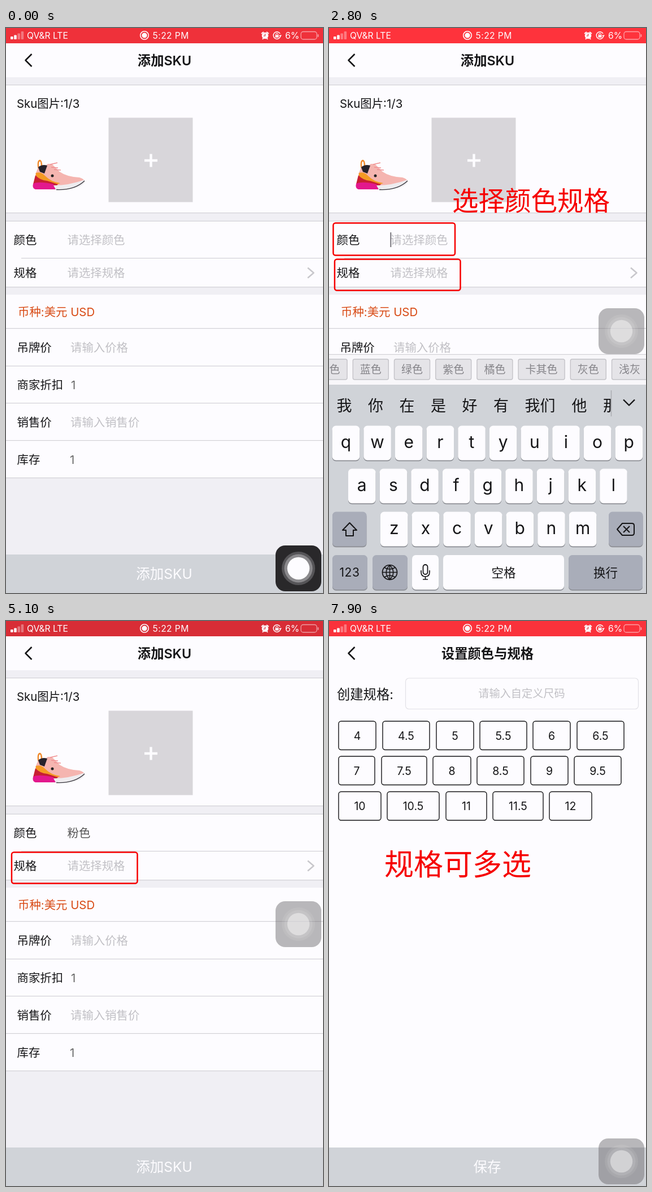
An HTML page that plays this animation: 561x998 px, repeating every 8000 ms.

```html
<!DOCTYPE html>
<html lang="zh-CN">
<head>
<meta charset="utf-8">
<style>
html, body { margin: 0; width: 100%; height: 100%; overflow: hidden; background: #fdfcff }
svg { display: block; width: 100vw; height: 100vh; font-family: Inter, "Noto Sans CJK SC", "Noto Sans CJK", sans-serif }
text { white-space: pre }
</style>
</head>
<body>
<svg id="stage" viewBox="0 0 561 998"></svg>
<script>
const WHITE = '#fdfcff', GREY = '#f0eff4', INK = '#151517', HINT = '#c1c0c5', LINE = '#d2d1d6', RED = '#f60000';

// y is the vertical middle of the text
const text = (x, y, s, size = 20.4, fill = INK, more = '') =>
  `<text x="${x}" y="${y + size * .37}" font-size="${size}" fill="${fill}" ${more}>${s}</text>`;
const mid = (x, y, s, size, fill, more = '') => text(x, y, s, size, fill, 'text-anchor="middle" ' + more);
const rect = (x, y, w, h, fill, more = '') =>
  `<rect x="${x}" y="${y}" width="${w}" height="${h}" fill="${fill}" ${more}/>`;
const circle = (x, y, r, fill, more = '') => `<circle cx="${x}" cy="${y}" r="${r}" fill="${fill}" ${more}/>`;
const path = (d, stroke, width = 2, fill = 'none') =>
  `<path d="${d}" fill="${fill}" stroke="${stroke}" stroke-width="${width}" stroke-linejoin="round"/>`;
const group = (id, body) => `<g id="${id}">${body}</g>`;
const line = (y, x = 0) => rect(x, y, 561 - x, 1.2, LINE);
const frame = (x, y, w, h) => rect(x, y, w, h, 'none', `rx="4" stroke="${RED}" stroke-width="2.5"`);
const header = title => path('M45.5 46L34.5 57L45.5 68', INK, 2.5) + mid(280.5, 57, title, 23.3, INK, 'font-weight="600"');
const footer = label => rect(0, 930, 561, 68, '#d0d3d8') + mid(280, 964, label, 24.5, WHITE);

const shoe =
  path('M58 250Q55 235 60 234Q63 235 63 244', '#f08a2c', 2.5) +
  path('M52 258L58 244Q66 247 74 240L81 240L95 254Q108 263 130 264Q140 267 139 273L95 279L66 273Z', 'none', 0, '#f5b5b0') +
  path('M57 246Q64 240 73 243L68 257L60 254Z', 'none', 0, '#26222a') +
  path('M53 256Q62 253 69 261Q80 272 96 274L84 279L52 268Z', 'none', 0, '#f59a24') +
  path('M52 260Q60 269 73 270L92 276L84 284L48 276Z', 'none', 0, '#c71f32') +
  path('M48 275Q58 270 84 276L88 285L52 285Q46 283 48 275Z', 'none', 0, '#e3188d') +
  path('M84 278Q112 278 139 268Q141 274 131 280Q118 286 88 285Z', 'none', 0, '#eeecef') +
  path('M89 285.5Q121 287 139 270', '#36343b', 1.3) +
  path('M78 241L91 238M80 246L92 247M85 250L97 251', '#f08f91', 1.6) +
  circle(82, 261, 2.5, '#222');

const formRows = [
  [564, '吊牌价', '请输入价格', 114, HINT],
  [630, '商家折扣', '1', 115, '#666'],
  [696, '销售价', '请输入销售价', 114, HINT],
  [762, '库存', '1', 113, '#666']
].map(([y, name, value, x, fill]) => text(19.5, y, name) + text(x, y, value, 20.4, fill)).join('');

const formPage = rect(0, 0, 561, 998, GREY) +
  rect(0, 27, 561, 60, WHITE) + rect(0, 100, 561, 227, WHITE) +
  rect(0, 341, 561, 116, WHITE) + rect(0, 471, 561, 323, WHITE) +
  header('添加SKU') + [100, 326, 340.5, 457, 530, 596.5, 662, 728, 794].map(y => line(y)).join('') + line(406, 27) +
  text(19, 133, 'Sku图片:1/3') + shoe +
  rect(181.5, 158.5, 149, 149, '#d8d6da') + rect(245, 231.8, 23, 4.4, WHITE) + rect(254.3, 222.5, 4.4, 23, WHITE) +
  text(13.5, 374, '颜色') + group('hint', text(108.5, 374, '请选择颜色', 20.4, HINT)) +
  group('picked', text(108.5, 374, '粉色', 20.4, '#555')) +
  text(13.5, 432, '规格') + text(108.5, 432, '请选择规格', 20.4, HINT) +
  path('M534 423.5L544.5 432.5L534 441.5', '#c8c7cc', 2.5) +
  text(21, 501, '币种:美元 USD', 20.4, '#d84a14') + formRows + footer('添加SKU') +
  group('caret', rect(108.3, 361, 2, 26, '#77767c'));

const sizeRows = [
  [177, [17, 83, 4], [95, 178, 4.5], [190, 256, 5], [267, 350, 5.5], [361, 427, 6], [439, 522, 6.5]],
  [239, [17, 81, 7], [93, 173, 7.5], [184, 251, 8], [262, 345, 8.5], [357, 423, 9], [434, 517, 9.5]],
  [301.5, [17, 92, 10], [103, 195, 10.5], [207, 279, 11], [290, 379, 11.5], [390, 465, 12]]
];
const sizePage = rect(0, 0, 561, 998, WHITE) + header('设置颜色与规格') + text(14, 129, '创建规格:', 23.3) +
  rect(135.5, 101, 412, 54.5, 'none', 'rx="6" stroke="#e2e1e6" stroke-width="1.2"') +
  mid(341, 128, '请输入自定义尺码', 19.2, HINT) +
  sizeRows.map(([y, ...cells]) => cells.map(([a, b, n]) =>
    rect(a, y, b - a, 50.5, 'none', `rx="4.5" stroke="${INK}" stroke-width="1.4"`) + mid((a + b) / 2, y + 25.5, n, 19.5)
  ).join('')).join('') + footer('保存');

let chipX = 11;
const chips = '黑色 白色 红色 黄色 蓝色 绿色 紫色 橘色 卡其色 灰色 浅灰 粉色'.split(' ').map(name => {
  const w = 25 + 19 * name.length, x = chipX;
  chipX += w + 10.2;
  return rect(x, 585, w, 36, '#e5e4e8', 'rx="3" stroke="#c4c3c8" stroke-width="1.4"') + mid(x + w / 2, 603, name, 19, '#858489');
}).join('');

const key = (x, y, w, fill = WHITE) =>
  rect(x, y + 1.7, w, 61, '#8c8e94', 'rx="6.5"') + rect(x, y, w, 61, fill, 'rx="6.5"');
const letters = (row, x, y) => [...row].map((c, i) => {
  const kx = x + 55.65 * i;
  return key(kx, y, 48.5) + mid(kx + 24.2, y + 28, c, 30);
}).join('');
const words = [...'我你在是好有', '我们'].map((w, i) => text(13.5 + 55.5 * i, 667, w, 27)).join('') +
  text(429.5, 667, '他', 27) + text(485, 667, '那', 27);
const DARK_KEY = '#a9adb9';

const keyboard = rect(0, 576, 561, 54, '#f8f7fa') + line(576) + group('chips', chips) +
  rect(0, 630, 561, 420, '#d0d3d8') + words + rect(499, 632, 62, 66, '#d0d3d8') +
  rect(498.8, 640, 1.4, 46, '#a9abb0') + path('M521 656.5L531 666.5L541 656.5', INK, 2.4) +
  letters('qwertyuiop', 5.7, 702.5) + letters('asdfghjkl', 34, 778.5) + letters('zxcvbnm', 91, 854.5) +
  key(6, 854.5, 60.5, DARK_KEY) + path('M36.5 874L49 887H43V897H30V887H24Z', INK, 2) +
  key(495, 854.5, 60.5, DARK_KEY) + path('M519 875H536Q540 875 540 879V892Q540 896 536 896H519L510 885.5Z', INK, 2) +
  path('M521 880L532 891M532 880L521 891', INK, 2) +
  key(6, 931, 62, DARK_KEY) + mid(36.5, 961, '123', 21, INK, 'letter-spacing=".5"') +
  key(77, 931, 62, DARK_KEY) + circle(107.5, 961.5, 13, 'none', `stroke="${INK}" stroke-width="1.7"`) +
  path('M107.5 948.5V974.5M94.5 961.5H120.5M98 953Q107.5 959 117 953M98 970Q107.5 964 117 970M107.5 948.5Q95 961.5 107.5 974.5Q120 961.5 107.5 948.5', INK, 1.5) +
  key(147, 931, 47) + rect(166.5, 948, 8, 17, 'none', `rx="4" stroke="${INK}" stroke-width="1.8"`) +
  path('M163 958V961Q163 969 170.5 969Q178 969 178 961V958M170.5 969V974M166 974H175', INK, 1.7) +
  key(202, 931, 214) + mid(309, 962, '空格', 21.5) +
  key(424, 931, 131, DARK_KEY) + mid(489.5, 962, '换行', 21.5);

const status = rect(0, 0, 561, 27, '#e8303b', 'id="bar"') +
  [5, 7.5, 10.5, 14].map((h, i) => rect(8 + 6.2 * i, 20 - h, 4.6, h, WHITE, `rx="1" opacity="${i < 2 ? 1 : .35}"`)).join('') +
  text(37, 13.5, 'QV&amp;R', 15.7, WHITE) + text(83, 13.5, 'LTE', 15.7, WHITE) +
  circle(245, 13, 7.3, 'none', `stroke="${WHITE}" stroke-width="1.6"`) + circle(245, 13, 4.6, WHITE) +
  text(259.5, 13.5, '5:22 PM', 15.7, WHITE, 'letter-spacing=".4"') +
  circle(458.5, 13.5, 5.8, WHITE) + path('M452 10L456 7M465 10L461 7M454 20L455.5 18M463 20L461.5 18', WHITE, 2) +
  path('M458.5 10V14H455.5', '#d8323c', 1.2) +
  path('M485 10A6.3 6.3 0 1 0 485.5 15', WHITE, 1.5) + path('M483 12.5H488L485.5 16Z', 'none', 0, WHITE) +
  rect(476.5, 12.3, 6, 4.5, WHITE) + path('M477.7 12V10.5Q479.5 8 481.3 10.5V12', WHITE, 1.1) +
  text(494, 13.5, '6%', 15.7, WHITE) +
  rect(522, 6.5, 28, 13.5, 'none', `rx="4" stroke="${WHITE}" stroke-width="1.3" opacity=".55"`) +
  rect(551.5, 11, 1.8, 5, WHITE, 'rx="1" opacity=".55"');

const knob = (base, rings) => rect(477, 914, 81, 81, base, 'rx="17"') +
  [29.5, 25, 19.7].map((r, i) => circle(517.5, 954.5, r, rings[i])).join('');

const stage = document.getElementById('stage');
stage.innerHTML =
  group('form', formPage) + group('keyboard', keyboard) + group('size', sizePage) + status +
  group('pickNote', text(218, 304.5, '选择颜色规格', 46.5, RED, 'font-weight="500"') + frame(7.5, 344.5, 215.5, 57)) +
  group('sizeFrame', frame(10, 408.5, 222.5, 55)) +
  group('multiNote', text(98, 430, '规格可多选', 52, RED, 'font-weight="500"')) +
  group('knob', group('knobOn', knob('#29282a', ['#565558', '#8b8a8d', WHITE])) +
    group('knobIdle', knob('rgba(100,98,102,.45)', ['rgba(255,255,255,.08)', 'rgba(255,255,255,.1)', 'rgba(255,255,255,.42)'])));

const el = id => document.getElementById(id);
const clamp = v => Math.min(1, Math.max(0, v));
const ramp = (t, a, b) => clamp((t - a) / (b - a));
const out = p => 1 - (1 - p) ** 3;
const smooth = p => p * p * (3 - 2 * p);
const move = (id, x, y) => el(id).setAttribute('transform', `translate(${x} ${y})`);
const show = (id, v) => el(id).setAttribute('opacity', +v);

function draw(t) {
  const pulse = Math.cos((t - 1900) / 870 * 2 * Math.PI);
  el('bar').setAttribute('fill', `rgb(${228 + 27 * pulse},${47 + 4 * pulse},${56 + 4 * pulse})`);

  move('keyboard', 0, 422 * (1 - out(ramp(t, 350, 710)) + smooth(ramp(t, 4300, 4600))));
  move('chips', -333 * smooth(ramp(t, 2100, 3100)), 0);

  const chosen = t >= 4200;
  show('hint', !chosen);
  show('picked', chosen);
  show('caret', t >= 400 && !chosen);
  show('pickNote', t >= 400 && t < 4300);
  show('sizeFrame', t >= 400 && t < 5500);
  show('multiNote', t >= 6600);

  const push = out(ramp(t, 5450, 5850));
  move('form', -168 * push, 0);
  move('size', 561 * (1 - push), 0);

  move('knob', 0, -419 * (smooth(ramp(t, 700, 1000)) - smooth(ramp(t, 5200, 5500))));
  const idle = ramp(t, 1100, 1500);
  show('knobOn', 1 - idle);
  show('knobIdle', idle);
}

const start = performance.now();
function tick() {
  draw((performance.now() - start) % 8000);
  requestAnimationFrame(tick);
}
tick();
</script>
</body>
</html>
```
